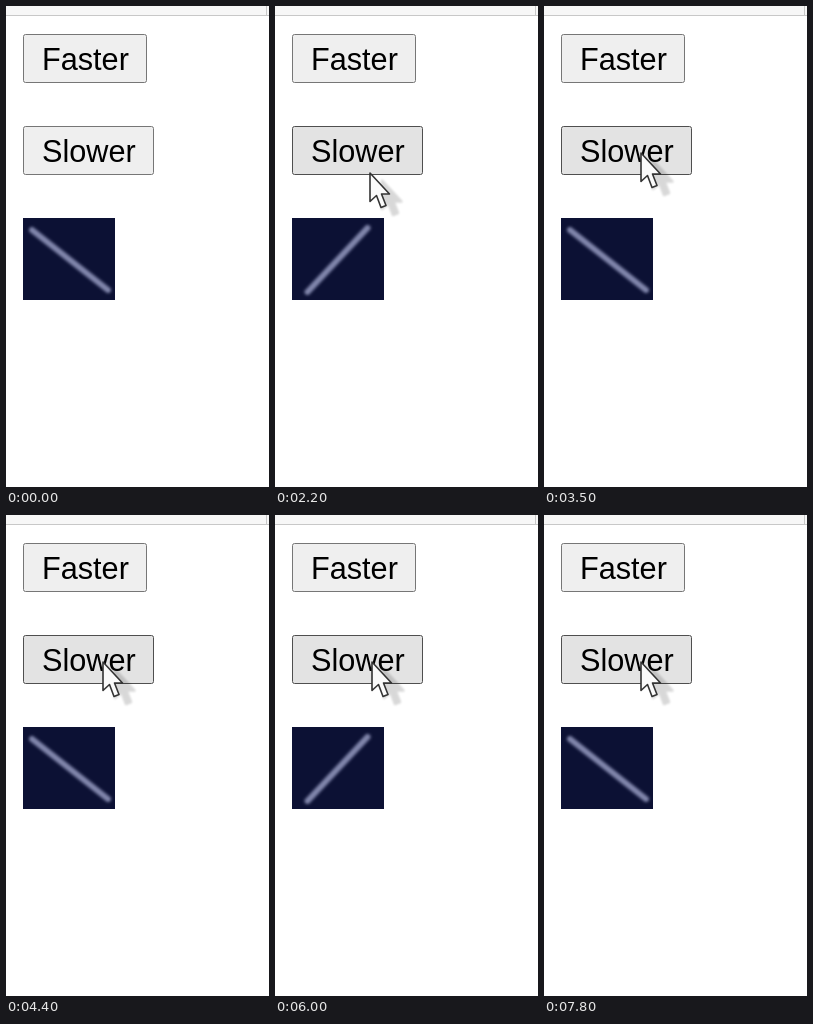
An HTML page for the animation above (8000 ms loop, 263 by 481 pixels).

```html
<!DOCTYPE html>
<html lang="en">
<head>
<meta charset="utf-8">
<title>Spinner speed</title>
<style>
  html, body { margin: 0; width: 100%; height: 100%; overflow: hidden; background: #fff; }
  svg { display: block; }
  text { font: 30.67px "Liberation Sans", Arial, sans-serif; fill: #000; }
  .button rect { fill: #efefef; stroke: #767676; }
  .button.hover rect { fill: #e3e3e3; stroke: #4f4f4f; }
  .button.pressed rect { fill: #f5f5f5; stroke: #8d8d8d; }
</style>
</head>
<body>
<svg width="263" height="481" viewBox="0 0 263 481">
  <defs>
    <filter id="soft" filterUnits="userSpaceOnUse" x="0" y="200" width="130" height="120">
      <feGaussianBlur stdDeviation="1.5"/>
    </filter>
    <filter id="shade" x="-20%" y="-20%" width="140%" height="140%">
      <feGaussianBlur stdDeviation="0.8"/>
    </filter>
    <path id="arrow" d="M1 1V29.5L7.5 23.5L12 35.5L17 33.5L12.5 22H20.5Z" stroke-linejoin="round"/>
  </defs>

  <rect width="263" height="9" fill="#f7f7f7"/>
  <path d="M0 9.5H263M260.5 0V9" stroke="#c8c8c8"/>
  <text x="151" y="-7">y</text>
  <text x="236" y="-7">y</text>

  <g class="button">
    <rect x="17.5" y="28.5" width="123" height="48" rx="2"/>
    <text x="36" y="63.7">Faster</text>
  </g>
  <g class="button" id="slower">
    <rect x="17.5" y="120.5" width="130" height="48" rx="2"/>
    <text x="36" y="155.7">Slower</text>
  </g>

  <rect id="tile" x="17" y="212" width="92" fill="#0c1134"/>
  <path id="bar" fill="none" stroke="#8186ac" stroke-width="6" stroke-linecap="round" filter="url(#soft)"/>

  <g id="cursor">
    <use href="#arrow" x="12" y="7.5" stroke="#000" stroke-width="2.5" opacity=".15" filter="url(#shade)"/>
    <use href="#arrow" fill="#fafafa" stroke="#333" stroke-width="1.6"/>
  </g>
</svg>
<script>
const LOOP = 8000, STEP = 100, HOLD = 150;
const byId = id => document.getElementById(id);
const [slower, tile, bar, cursor] = ["slower", "tile", "bar", "cursor"].map(byId);

// Spinner poses in turning order: \ | / -
const poses = [
  { height: 82, d: "M26 224L102 284" },
  { height: 96, d: "M62.5 222V298" },
  { height: 82, d: "M32.5 286L92.5 222" },
  { height: 88, d: "M24 256H102" }
];

// Each click on Slower adds 50 ms to the time between turns
const spinStart = 100, firstPeriod = 200, extraPeriod = 50;
const clicks = [3100, 5700, 7800];

// Cursor path: time and tip position
const path = [
  { at: 1200, x: 152, y: 40 },
  { at: 1400, x: 197, y: 54 },
  { at: 1600, x: 161, y: 59 },
  { at: 1700, x: 161, y: 59 },
  { at: 2200, x: 94, y: 166 },
  { at: 2600, x: 96, y: 146 }
];

function turnsAt(time) {
  const starts = [spinStart, ...clicks];
  return starts.reduce((turns, from, i) => {
    const elapsed = Math.min(time, starts[i + 1] ?? LOOP) - from;
    return turns + Math.max(0, Math.floor(elapsed / (firstPeriod + i * extraPeriod)));
  }, 0);
}

function tipAt(time) {
  const next = path.findIndex(point => point.at > time);
  if (next < 0) return path[path.length - 1];
  const a = path[Math.max(0, next - 1)], b = path[next];
  const p = Math.max(0, (time - a.at) / (b.at - a.at || 1));
  const ease = p * p * (3 - 2 * p);
  return { x: a.x + (b.x - a.x) * ease, y: a.y + (b.y - a.y) * ease };
}

function draw(time) {
  const pose = poses[turnsAt(time) % poses.length];
  tile.setAttribute("height", pose.height);
  bar.setAttribute("d", pose.d);

  const visible = time >= path[0].at;
  const { x, y } = tipAt(time);
  cursor.setAttribute("visibility", visible ? "visible" : "hidden");
  cursor.setAttribute("transform", `translate(${x} ${y})`);

  const hover = visible && x < 148 && y >= 120 && y < 169;
  const pressed = clicks.some(click => time >= click - HOLD && time < click);
  slower.setAttribute("class", "button" + (pressed ? " pressed" : hover ? " hover" : ""));
}

const start = performance.now();
function frame() {
  const time = (performance.now() - start) % LOOP;
  draw(Math.floor(time / STEP) * STEP);
  requestAnimationFrame(frame);
}
frame();
</script>
</body>
</html>
```
